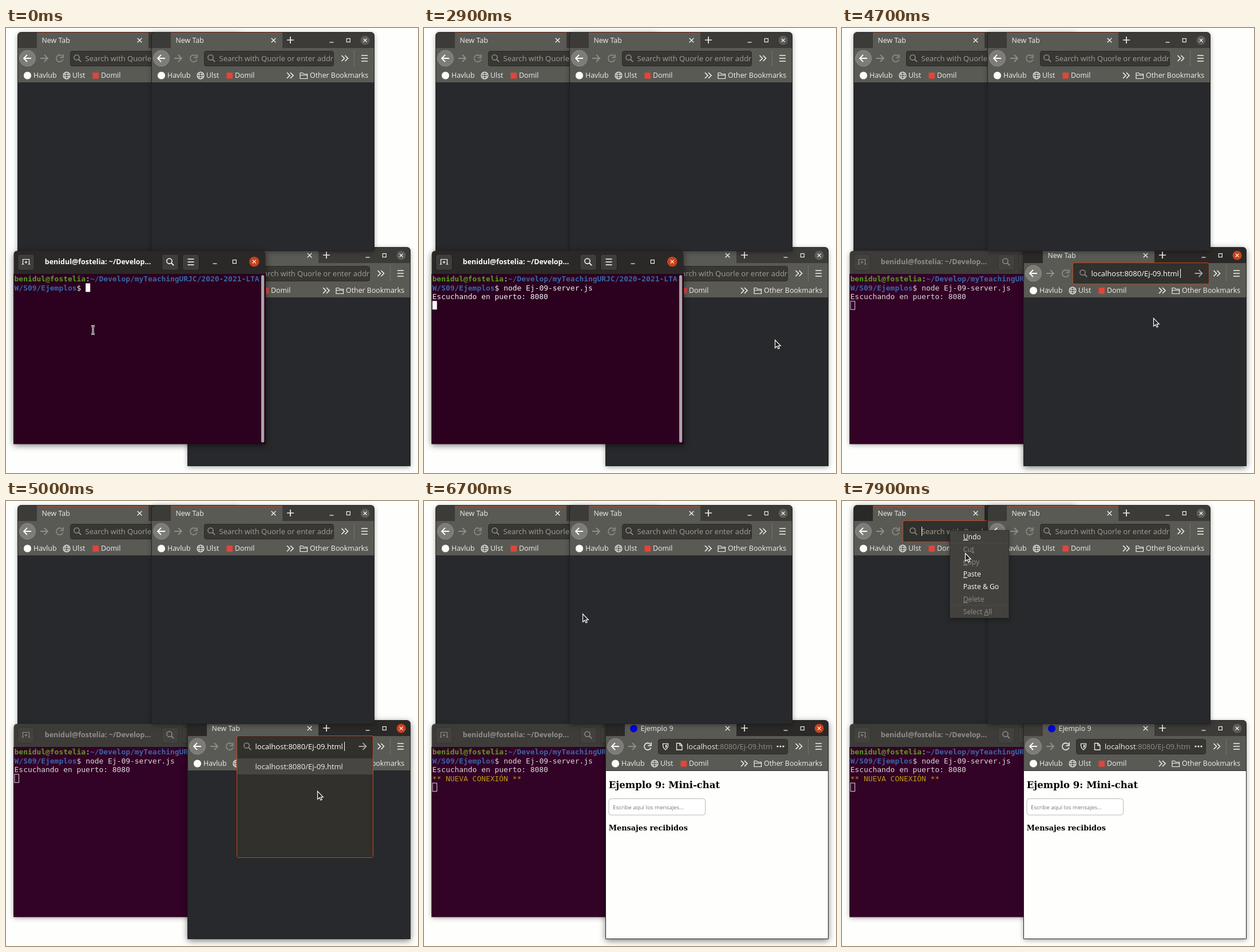
An HTML page for the animation above (8 s loop, 720 by 778 pixels).

```html
<!DOCTYPE html>
<html lang="es">
<head>
<meta charset="utf-8">
<title>Mini-chat</title>
<style>
  html, body { margin: 0; width: 100%; height: 100%; overflow: hidden; background: #fefffc; }
  svg { display: block; }
  text { white-space: pre; font-family: "Open Sans", "Noto Sans", sans-serif; }
  .mono { font-family: "DejaVu Sans Mono", monospace; }
  .serif { font-family: "DejaVu Serif", serif; font-weight: bold; }
  .b { font-weight: bold; }
  .u { text-decoration: underline; }
  .shade { filter: drop-shadow(0 2px 4px rgba(0,0,0,.38)); }
  .shade.on { filter: drop-shadow(0 3px 6px rgba(0,0,0,.55)); }
</style>
</head>
<body>
<svg id="stage" width="720" height="778" viewBox="0 0 720 778"></svg>
<script>
const LOOP = 8000, STEP = 100;
const stage = document.getElementById('stage');
const ORANGE = '#c8421c', LIGHT = '#f0efed', DIM = '#8f8e8a';

// drawing helpers
const rect = (x, y, w, h, fill, more = '') =>
  `<rect x="${x}" y="${y}" width="${w}" height="${h}" fill="${fill}" ${more}/>`;
const line = (d, color, w = 1, more = '') =>
  `<path d="${d}" fill="none" stroke="${color}" stroke-width="${w}" ${more}/>`;
const disc = (x, y, r, fill, more = '') =>
  `<circle cx="${x}" cy="${y}" r="${r}" fill="${fill}" ${more}/>`;
const text = (x, y, s, size, fill, more = '') =>
  `<text x="${x}" y="${y}" font-size="${size}" fill="${fill}" ${more}>${s}</text>`;
const group = (x, y, body) => `<g transform="translate(${x} ${y})">${body}</g>`;
const clip = (x, y, w, h, body) =>
  `<svg x="${x}" y="${y}" width="${w}" height="${h}" overflow="hidden">${body}</svg>`;
const clamp = v => Math.max(0, Math.min(1, v));
const mix = (a, b, k) => `rgb(${a.map((v, i) => Math.round(v + (b[i] - v) * k))})`;
const frame = (w, h, r) => `M.5 ${h - .5}V${r}Q.5 .5 ${r} .5H${w - r}Q${w - .5} .5 ${w - .5} ${r}V${h - .5}Z`;

const cross = (x, y, r, color, w = 1.4) =>
  line(`M${x - r} ${y - r}l${2 * r} ${2 * r}m0 ${-2 * r}l${-2 * r} ${2 * r}`, color, w);
const bars = (x, y, color) => line(`M${x} ${y}h11m-11 5h11m-11 5h11`, color, 1.6);
const chevrons = (x, y) => line(`M${x - 5} ${y - 5}l5 5l-5 5m6 -10l5 5l-5 5`, LIGHT, 1.6);
const lens = (x, y, color) =>
  disc(x - 1, y - 1.5, 4.6, 'none', `stroke="${color}" stroke-width="1.5"`) +
  line(`M${x + 2.3} ${y + 1.8}l4.4 4.4`, color, 1.8);
const arrow = (x, y, dir, color) =>
  line(`M${x - 6.5 * dir} ${y}H${x + 6 * dir}m${-5.5 * dir} -6l${6 * dir} 6l${-6 * dir} 6`, color, 1.8);
const reload = (x, y, color) =>
  line(`M${x + 4.6} ${y - 3.6}A6 6 0 1 0 ${x + 5.6} ${y + 2}M${x + 6} ${y - 7}v5.6h-5.6`, color, 1.6);
const globe = (x, y) =>
  disc(x, y, 6, 'none', `stroke="${LIGHT}" stroke-width="1.2"`) +
  `<ellipse cx="${x}" cy="${y}" rx="2.8" ry="6" fill="none" stroke="${LIGHT}"/>` +
  line(`M${x - 5.5} ${y - 2}h11m-11 4h11`, LIGHT);

function winButtons(x, y, gap, closeFill, r) {
  return line(`M${x - 3.5} ${y + 3.5}h7`, LIGHT, 1.3) +
    rect(x + gap - 3, y - 3, 6, 6, 'none', `stroke="${LIGHT}" stroke-width="1.2"`) +
    disc(x + 2 * gap, y, r, closeFill) + cross(x + 2 * gap, y, 2.9, '#fff', 1.3);
}

function addressBar(o) {
  let s = '';
  if (o.focus) {
    s += rect(86.5, 27.5, 238, 37, '#31302c', `rx="2.5" stroke="${ORANGE}"`);
  } else {
    s += rect(92.5, 33.5, 226, 26, '#383732', 'rx="3.5" stroke="#2b2a27"');
  }
  if (o.visited) {
    s += line('M100.5 41.5q4.5 0 4.5 -1q0 1 4.500 1q.5 7 -4.500 10.500q-5 -3.500 -4.500 -10.500z', LIGHT, 1.3) +
      `<path d="M105 43v6.500q2.800 -2.500 2.500 -6z" fill="${LIGHT}"/>` +
      line('M124.500 40.500h6l3.500 3.500v8h-9.500zm5.500 0v4h4', LIGHT, 1.3) +
      clip(141, 33, 151, 26, text(1, 17.5,
        `localhost<tspan fill="${DIM}">:8080/Ej-09.html</tspan>`, 13, LIGHT)) +
      [301, 306, 311].map(x => disc(x, 46, 1.6, LIGHT)).join('');
    return s;
  }
  s += lens(104.5, 46, DIM);
  if (o.typed) {
    s += text(118.5, 50.5, 'localhost:8080/Ej-09.html', 13, '#fff') +
      rect(274, 38, 1, 16, '#fff') + arrow(306, 46, 1, '#a5a4a0');
  } else {
    s += clip(118, 33, 200, 26, text(.5, 17.5, 'Search with Quorle or enter address', 13, '#a09f9b'));
    if (o.focus) s += rect(119, 38, 1, 16, '#fff');
  }
  return s;
}

function browser(x, y, o = {}) {
  const W = 390, H = 383, bar = o.active ? '#2a2927' : '#3c3b38';
  let s = `<path class="shade ${o.active ? 'on' : ''}" d="${frame(W, H, 7)}" fill="${bar}"/>`;
  s += rect(0, 28, W, 61, '#5a5a55') + rect(34, 1, 195, 28, '#5a5a55') +
    rect(34, 1, 195, 1.6, o.active ? '#b9482a' : '#a5452c') +
    rect(0, 88, W, H - 88, o.page ? '#fefffc' : '#28292c');

  const title = o.title || 'New Tab';
  s += text(o.title ? 61.5 : 42.5, 18.8, title, 12.4, LIGHT);
  if (o.dot !== undefined) s += disc(53 + o.dot, 15, 2.1, '#2b86e0');
  if (o.page) s += disc(49.5, 15, 6.5, '#0404d8');
  s += cross(213.5, 14.5, 3.8, LIGHT) + line('M237 14h12m-6 -6v12', LIGHT, 1.7) +
    winButtons(315, 14.5, 29.3, o.active ? ORANGE : '#5d5c58', 8);

  s += disc(17.5, 46, 14, '#7d7c78', 'stroke="#8e8d89"') + arrow(17.5, 46, -1, '#fff') +
    arrow(46.5, 46, 1, DIM);
  s += o.stop ? line('M68 40l11 11.500', LIGHT, 1.7) : reload(74, 46, o.page ? LIGHT : DIM);
  s += addressBar(o) + chevrons(337.5, 46) + line('M354.5 32v28', '#74736e') + bars(367, 41, LIGHT);

  s += disc(17.5, 76, 6.6, '#fbfbfa') + text(28, 80.3, 'Havlub', 12.4, LIGHT) +
    globe(86, 76) + text(96, 80.3, 'Ulst', 12.4, LIGHT) +
    rect(131.5, 71, 10.5, 10.5, '#e2453a') + text(146, 80.3, 'Domil', 12.4, LIGHT) +
    chevrons(242, 76) +
    line('M260 71.500h4.500l1.500 2h6.500v8h-12.500zm0 4h12.500', LIGHT, 1.2) +
    text(277, 80.3, 'Other Bookmarks', 12.4, LIGHT);

  if (o.page) {
    s += rect(0, 88, W, 1, '#2b2a28') +
      text(5.8, 119, 'Ejemplo 9: Mini-chat', 16.5, '#000', 'class="serif"') +
      rect(6, 137.5, 168.5, 28.5, '#fff', 'rx="4" stroke="#b9b9b7"') +
      text(13, 155.5, 'Escribe aquí los mensajes...', 9.75, '#777') +
      text(5.8, 193, 'Mensajes recibidos', 12.85, '#000', 'class="serif"');
  }
  if (o.waiting) {
    s += `<path d="M0 ${H}V363.5H136q4 0 4 4V${H}z" fill="#3a3936" stroke="#6c6b67"/>` +
      text(4, 377.5, 'Waiting for localhost…', 12.4, LIGHT);
  }
  s += line(frame(W, H, 7), '#232220');
  if (o.panel) {
    s += rect(86.5, 27.5, 238, 213, 'none', `rx="2.5" stroke="${ORANGE}"`) +
      rect(87, 64, 237, 176, '#31302c') + rect(87, 67, 237, 28, '#474641') +
      clip(87, 64, 237, 34, text(31.5, 21.5, 'localhost:8080/Ej-09.html', 13, LIGHT));
  }
  return group(x, y, s);
}

const CELL = 7.785, X0 = 14.6, ROW = 15.4;
const mono = (col, row, s, fill, cls = '') =>
  text(X0 + col * CELL, 443.4 + row * ROW, s, 12.93, fill, `class="mono ${cls}"`);

function terminal(t) {
  const k = clamp((t - 3000) / 400), off = t >= 3100;
  const head = mix([42, 41, 39], [61, 60, 57], k), ink = off ? '#8f8e8b' : '#fff';
  const tool = x => rect(x + .5, 395.5, 29, 28, off ? '#42413e' : '#3e3d3a',
    `rx="4" stroke="${off ? '#34332f' : '#1f1e1c'}"`);
  let s = `<g transform="translate(13 389)"><path class="shade ${off ? '' : 'on'}" d="${frame(441, 338, 7)}" fill="${head}"/></g>` +
    rect(13, 430, 441, 297.5, mix([43, 1, 31], [51, 2, 39], k)) +
    tool(20) + tool(272) + tool(308) +
    line('M29.500 413v-8.500h11v8.500m-13 0h4m7 0h4m-7.500 -6v5m-2.500 -2.500h5', ink, 1.2) +
    lens(286.5, 409, ink) + bars(317.5, 404, ink).replace('1.6', '1.3') +
    text(160.5, 413.4, 'benidul@fostelia: ~/Develop...', 12.5, ink, 'class="b" text-anchor="middle"') +
    winButtons(365, 408.5, 34.4, off ? '#5d5c58' : ORANGE, 8.7);
  if (!off) s += rect(446, 432, 5.2, 292.5, '#a9a6a5', 'rx="2.6"');

  const white = off ? '#dcd8da' : '#f4f2f3';
  s += mono(0, 0, 'benidul@fostelia', '#58a01a', 'b') + mono(16, 0, ':', white) +
    mono(17, 0, '~/Develop/myTeachingURJC/2020-2021-LTA', '#3a66a8', 'b') +
    mono(0, 1, 'W/S09/Ejemplos', '#3a66a8', 'b') + mono(14, 1, '$', white);
  const cmd = t < 300 ? '' : t < 700 ? 'clear' : 'node Ej-09-server.js ';
  s += mono(16, 1, cmd, white);
  if (t >= 1800) s += mono(0, 2, 'Escuchando en puerto: 8080', white);
  if (t >= 6200) s += mono(0, 3, '** NUEVA CONEXIÓN **', '#bf9a10');

  const row = t < 1500 ? 1 : t < 1800 ? 2 : t < 6200 ? 3 : 4;
  const cx = X0 + (row === 1 ? 16 + cmd.length : 0) * CELL, cy = 431 + row * ROW;
  const hidden = (t >= 1300 && t < 1500) || (t >= 2100 && t < 2700);
  if (off) s += rect(cx + .3, cy + .5, 7.6, 14.5, 'none', `stroke="${white}"`);
  else if (!hidden) s += rect(cx, cy, 8, 15, '#fff');
  return s;
}

const u = c => `<tspan class="u">${c}</tspan>`;
const ITEMS = [
  [u('U') + 'ndo', 1], ['Cu' + u('t'), 0], [u('C') + 'opy', 0], [u('P') + 'aste', 1],
  ['Paste &amp; Go', 1], [u('D') + 'elete', 0], ['Select ' + u('A') + 'll', 0]
];
function menu(x, y, m) {
  const pitch = 21.85, over = m.x > x + 3 ? Math.floor((m.y - y) / pitch) : -1;
  let s = rect(.5, .5, 103, 153, '#42413d', 'class="shade" stroke="#2f2e2b"');
  ITEMS.forEach(([label, live], i) => {
    if (live && i === over) s += rect(1, 1 + i * pitch, 102, pitch, '#5b5a55');
    s += text(23.7, 15.8 + i * pitch, label, 12.2, live ? '#fff' : DIM);
  });
  s += line('M1 22.500h102m-102 109h102', '#4b4a46');
  return group(x, y, s);
}

// time, x, y, text pointer
const PATH = [
  [0, 152, 528, 1], [1700, 152, 528, 1], [1800, 311, 719, 1], [2300, 311, 719, 1],
  [2500, 455, 650, 0], [2900, 613, 545, 0], [3200, 613, 545, 0], [3500, 540, 462, 0],
  [3700, 506, 432, 1], [4000, 508, 436, 1], [4100, 509, 438, 0], [4500, 544, 507, 0],
  [5600, 544, 507, 0], [5700, 543, 508, 0], [6100, 543, 508, 0], [6500, 302, 254, 0],
  [6700, 277, 197, 0], [7100, 195, 60, 1], [7200, 188, 51, 1], [7500, 188, 51, 0],
  [7600, 188, 51, 0], [7900, 215, 91, 0], [8000, 215, 91, 0]
];
function pointer(t) {
  let i = 0;
  while (i < PATH.length - 2 && t >= PATH[i + 1][0]) i++;
  const [t0, x0, y0, beam] = PATH[i], [t1, x1, y1] = PATH[i + 1];
  const k = (t - t0) / (t1 - t0);
  return { x: x0 + (x1 - x0) * k, y: y0 + (y1 - y0) * k, beam, hidden: t >= 400 && t < 1800 };
}
function drawPointer(m) {
  if (m.hidden) return '';
  const beam = 'M-3 -7q3 0 3 2q0 -2 3 -2m-3 2v10m-3 2q3 0 3 -2q0 2 3 2';
  return group(m.x, m.y, m.beam
    ? line(beam, '#fff', 3) + line(beam, '#222', 1)
    : '<path d="M.5 .5V14.500L3.800 11.500L6 16L8.200 15L6.200 10.700H10.300Z" fill="#242424" stroke="#fff" stroke-width="1.2"/>');
}

function draw(t) {
  const m = pointer(t);
  const raised = t >= 3100, page = t >= 6200, loading = t >= 5700 && !page;
  const left = browser(20, 7, { active: t >= 7300, focus: t >= 7300 });
  const right = browser(254, 7);
  const chat = browser(317, 383, {
    active: raised && t < 7300,
    focus: t >= 3900 && t < 5700,
    typed: t >= 4700 && t < 5700,
    panel: t >= 4800 && t < 5700,
    visited: t >= 5700,
    title: t >= 5900 ? 'Ejemplo 9' : '',
    dot: loading ? -4 * Math.cos((t - 5700) / 300 * Math.PI) - 4 : undefined,
    stop: loading, waiting: loading, page
  });
  const term = terminal(t);
  let s = left + (raised ? term + chat + right : chat + right + term);
  if (t >= 4100 && t < 4700) s += menu(508, 438, m);
  if (t >= 7500) s += menu(188, 51, m);
  stage.innerHTML = s + drawPointer(m);
}

let shown = -1;
const start = performance.now();
function tick() {
  const t = Math.floor(((performance.now() - start) % LOOP) / STEP) * STEP;
  if (t !== shown) draw(shown = t);
  requestAnimationFrame(tick);
}
tick();
</script>
</body>
</html>
```
